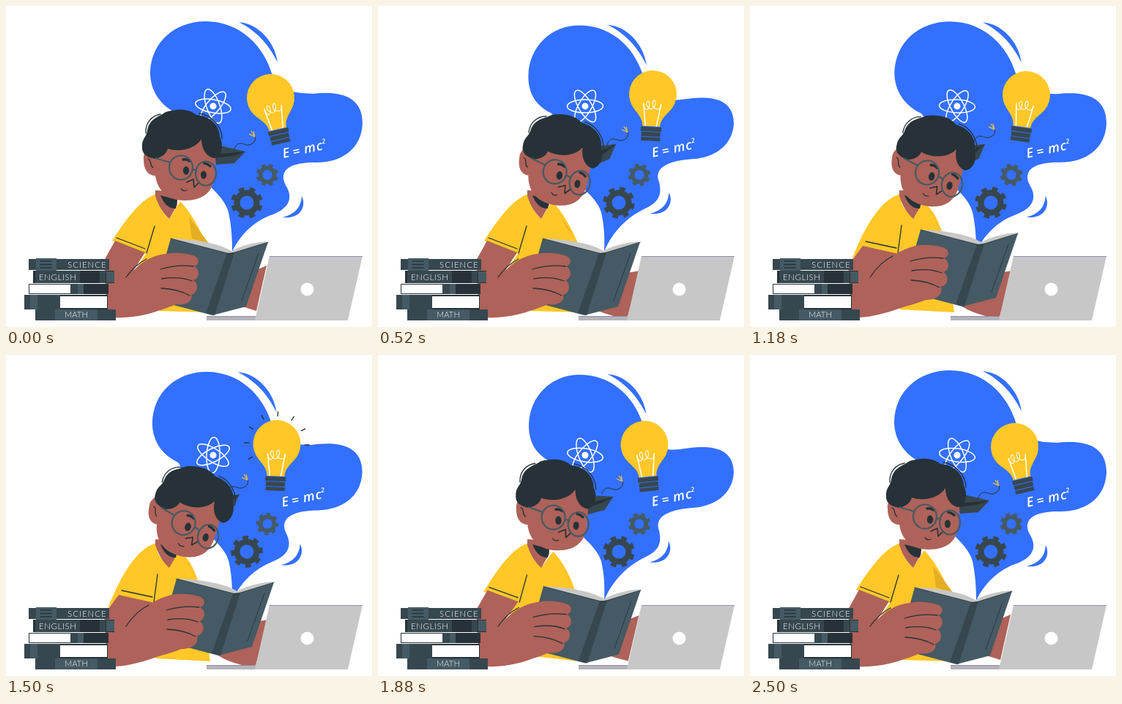
An HTML page that plays this animation: 500 by 439 pixels, repeating every 2.52 s.

```html
<!DOCTYPE html>
<html lang="en">
<head>
<meta charset="utf-8">
<title>Reading and ideas</title>
<style>
html, body { margin: 0; width: 100%; height: 100%; overflow: hidden; background: #fff; }
svg { display: block; width: 100vw; height: 100vh; }
.blue { fill: #3370ff; }
.ink { fill: #263238; }
.dark { fill: #37474f; }
.slate { fill: #455a64; }
.skin { fill: #ae6259; }
.sun { fill: #ffc727; }
.line { fill: none; stroke: #263238; stroke-width: 1.3; stroke-linecap: round; stroke-linejoin: round; }
.chalk { fill: none; stroke: #fff; stroke-width: 1.5; }
.frame { fill: none; stroke: #455a64; stroke-width: 2.2; }
text { fill: #fff; font: 300 11.5px Lato, sans-serif; }
#formula text { font: italic 600 18px "Open Sans", sans-serif; }
</style>
</head>
<body>
<svg viewBox="0 0 500 439">
  <defs>
    <g id="gear" fill="none">
      <circle r="13.5" stroke-width="8"/>
      <circle r="18.5" stroke-width="6.5" pathLength="16" stroke-dasharray="1" transform="rotate(11.25)"/>
    </g>
  </defs>

  <path id="blob" class="blue"/>
  <path id="topArc" class="blue" d="M318 22C344 24 367 48 371 77C361 57 346 36 318 22Z"/>
  <path id="lowArc" class="blue" d="M404 260C411 274 402 292 378 289C394 285 403 276 404 260Z"/>

  <g id="atom" class="chalk">
    <ellipse rx="24.5" ry="9"/>
    <ellipse rx="24.5" ry="9" transform="rotate(60)"/>
    <ellipse rx="24.5" ry="9" transform="rotate(120)"/>
    <circle r="4.5" fill="#fff" stroke="none"/>
  </g>
  <g id="formula">
    <text x="0" y="0">E</text><text x="14" y="1">=</text><text x="30" y="0">m</text><text x="47" y="0">c</text>
    <text x="56" y="-8" style="font-size:9px">2</text>
  </g>
  <use id="bigGear" href="#gear" stroke="#37474f"/>
  <use id="smallGear" href="#gear" stroke="#455a64"/>

  <g id="bulb">
    <g id="rays" class="line"></g>
    <path class="sun" d="M-12 44C-12 35 -18 29 -24 22A32.5 32.5 0 1 1 24 22C18 29 12 35 12 44Z"/>
    <path class="chalk" d="M-8 44L-12 13M7 44L12 13"/>
    <path class="chalk" style="stroke-width:1" d="M-12 13C-11 26 -3 23 -4 13C-5 6 -11 12 -6 18C0 25 5 16 4 10C2 5 -2 13 2 18C8 23 12 19 12 13"/>
    <path class="dark" d="M-14 45H14V51H-14ZM-13 52H13V58H-13ZM-13 59H13V64H-13Z"/>
  </g>

  <g id="cap">
    <path class="dark" d="M284 189L327 199L312 215L287 217Z"/>
    <path class="ink" d="M284 203L327 199L310 205L284 208Z"/>
  </g>
  <g id="tassel">
    <path class="line" style="stroke-width:1" d="M312 196C314 186 322 187 328 190C336 191 343 185 340 178"/>
    <path d="M340 179L332 175M340 179L335 171M340 179L338 171" stroke="#d3b369" stroke-width="1.4"/>
  </g>

  <path id="shirt" class="sun"/>
  <path id="fold" fill="#e3ae22"/>
  <path id="seams" class="line"/>
  <path class="skin" d="M204 252L204 260C209 275 215 284 223 291L234 272L234 254Z"/>
  <path class="ink" d="M211 259L234 265L232 277C222 277 216 271 211 259Z"/>

  <g id="head">
    <path class="skin" d="M203 180C196 198 187 197 188 210C188 224 194 232 204 232C207 253 222 266 244 266C270 266 283 254 285 232L287 190L250 165Z"/>
    <g id="hair">
      <path class="ink" d="M204 209C192 207 185 202 186 192C186 180 192 180 193 170C196 153 211 151 218 145C233 140 250 140 260 149C278 150 292 163 292 179C298 190 295 205 285 208C274 207 267 195 267 182C257 197 236 200 221 195C219 203 212 207 204 209Z"/>
      <path class="line" d="M191 174C190 160 199 150 211 148M264 147C281 149 295 165 295 181"/>
    </g>
    <path class="line" d="M194 209C200 211 195 217 201 221"/>
    <path class="line" style="stroke-width:3.5" d="M242 210Q247 209 251 212"/>
    <ellipse class="ink" cx="246" cy="225" rx="4.2" ry="5.8"/>
    <path class="line" style="stroke-width:1.6" d="M247 241L256 237L257 248L264 241"/>
    <path class="line" d="M239 250Q242 254 247 252"/>
    <path class="frame" d="M254 225Q258 222 261 226M224 214L204 208"/>
    <ellipse class="frame" cx="239" cy="221" rx="16" ry="16.5"/>
    <g id="farEye">
      <path class="line" style="stroke-width:3.5" d="M271 215Q276 216 279 219"/>
      <ellipse class="ink" cx="270" cy="231" rx="4" ry="5.6"/>
      <ellipse class="frame" cx="273" cy="229" rx="14" ry="16.5"/>
    </g>
  </g>

  <path id="farHand" class="skin"/>
  <g id="book">
    <path fill="#c7c7c7" d="M226 318C260 319 292 325 308 335C322 327 340 323 358 322L307 342Z"/>
    <path class="slate" d="M225 318L306 339L358 323L328 411L282 423L214 405L209 374Z"/>
    <path class="dark" d="M302 338L312 337L285 423L273 420Z"/>
    <path class="line" style="stroke-width:.8" d="M225 318L306 339L358 323M345 338L322 403"/>
  </g>
  <path id="arm" class="skin"/>
  <path id="creases" class="line"/>

  <path fill="#b4b4b8" d="M274 424H407V430H274Z"/>
  <path fill="#c7c7c7" d="M360 342H487L467 430H340Z"/>
  <path d="M360 342.5H487M274 424.5H340" stroke="#8580b5" stroke-width=".8"/>
  <circle cx="411.5" cy="387.5" r="9" fill="#fff"/>

  <g id="stack">
    <path class="ink" d="M31 346H141V361H31ZM37 362H148V379H37ZM31 380H140V394H31ZM25 395H139V415H25ZM40 415H150V430H40Z"/>
    <path class="dark" d="M31 346H41V361H31ZM69 346H141V361H69ZM40 362H101V379H40ZM128 362H136V379H128ZM88 380H98V394H88ZM25 395H74V415H25ZM40 415H150V430H40Z"/>
    <path class="slate" d="M41 345H69V362H41ZM137 363H148V378H137ZM98 380H106V394H98ZM33 395H43V415H33ZM67 415H125V430H67Z"/>
    <path fill="#fff" d="M32 381H88V393H32ZM74 397H138V413H74Z"/>
    <path class="line" style="stroke-width:1.5" d="M47 349H62M47 353.5H62M47 358H62M104 367H126M104 373H126"/>
    <text x="84" y="358" letter-spacing="1">SCIENCE</text>
    <text x="45" y="374.5" letter-spacing=".6">ENGLISH</text>
    <text x="80" y="426" letter-spacing=".2" style="font-size:11px">MATH</text>
  </g>
</svg>
<script>
const LOOP = 2520;
const TIMES = [0, 520, 840, 1180, 1500, 1880, LOOP];
const $ = id => document.getElementById(id);
const pose = (id, value) => $(id).setAttribute('transform', value);

const shapes = {
  blob: [
    'M309 336C309 318 308 300 304 282C298 260 275 245 246 215C236 175 244 152 232 146C210 135 197 115 197 91C198 50 230 21 273 21C320 21 352 55 363 92C372 118 395 119 420 120C440 118 487 115 487 160C486 198 455 214 425 214C395 213 370 221 382 245C394 264 385 278 362 286C340 294 320 312 309 336Z',
    'M309 336C310 316 309 300 305 282C298 260 275 247 246 215C236 175 246 152 236 146C216 136 206 120 206 96C207 55 238 27 275 27C318 27 348 55 361 92C372 128 390 131 412 129C438 125 486 118 486 161C484 192 458 207 430 209C402 211 376 219 384 240C388 258 384 268 362 278C342 288 320 308 309 336Z'],
  shirt: [
    'M206 257C185 263 165 290 145 321L191 339L175 363L205 417L279 419L273 324C264 304 254 284 238 267L223 291C213 283 207 270 206 257Z',
    'M206 257C180 263 157 300 139 347L155 329L203 341L172 363L205 415L279 419L267 313C260 298 250 282 238 267L223 291C213 283 207 270 206 257Z'],
  fold: ['M250 288L278 326L254 318Z', 'M250 290L267 313L258 302Z'],
  seams: ['M151 317L190 332M203 301L192 338', 'M158 322L200 331M207 300L202 338'],
  farHand: [
    'M330 366L356 355L342 417L326 412Q322 411 318 408Z',
    'M334 366L358 362L341 425L322 424Q302 419 290 411Z'],
  arm: [
    'M149 321L190 337L174 362C185 350 200 341 218 339C232 336 250 339 258 342C265 346 264 354 257 356C266 361 264 373 256 375C264 380 262 393 253 395C256 404 245 410 232 408C225 411 215 415 210 416C190 424 165 427 148 426L138 420L134 348Z',
    'M154 328L203 339L172 362C188 345 205 333 226 328C240 325 258 328 266 331C273 335 272 343 265 345C274 350 272 362 264 364C273 369 271 382 261 384C264 396 253 402 240 402C230 406 220 409 212 411C194 417 168 426 148 426L138 420L134 355Z'],
  creases: [
    'M164 371Q176 354 192 346M211 360Q234 353 256 356M213 373Q236 369 254 376M212 386Q235 387 251 396',
    'M164 371Q178 350 195 342M219 349Q242 342 264 345M221 362Q244 358 262 365M220 375Q243 376 259 385']
};

// Blend two paths that share the same commands.
function mix(id, f) {
  const [a, b] = shapes[id];
  const ends = b.match(/[\d.]+/g);
  let i = 0;
  $(id).setAttribute('d', a.replace(/[\d.]+/g, n => (+n + (ends[i++] - n) * f).toFixed(2)));
}

// Cyclic monotone spline through six values placed at TIMES.
function key(t, ...v) {
  const span = i => TIMES[i + 1] - TIMES[i];
  const slope = i => (v[(i + 1) % 6] - v[i]) / span(i);
  const tangent = i => {
    const a = slope((i + 5) % 6), b = slope(i % 6);
    return a * b > 0 ? 2 * a * b / (a + b) : 0;
  };
  const i = TIMES.findIndex(x => x > t) - 1;
  const h = span(i), u = (t - TIMES[i]) / h, w = u * u * (3 - 2 * u);
  return v[i] * (1 - w) + v[(i + 1) % 6] * w
    + h * u * (1 - u) * (tangent(i) * (1 - u) - tangent(i + 1) * u);
}

for (let a = -120; a <= 90; a += 30)
  $('rays').innerHTML += `<path d="M0 -38V-44" transform="rotate(${a})"/>`;

function draw(now) {
  const t = now % LOOP;
  const turn = t / LOOP;
  const swell = (1 - Math.cos(turn * 4 * Math.PI)) / 2;
  const nod = key(t, 0, .67, .53, .8, 1, .13);
  const lift = key(t, 0, 0, 0, 1, 1, .12);

  mix('blob', swell);
  pose('topArc', `translate(${-4.5 * swell} ${4 * swell})`);
  pose('lowArc', `translate(${-7 * swell} ${-5.5 * swell})`);
  pose('atom', `translate(283 137) rotate(${10 + 240 * turn})`);
  pose('formula', `translate(${379 - 4 * swell} ${208 - swell}) rotate(-12)`);
  pose('bigGear', `translate(329 269) rotate(${180 * turn})`);
  pose('smallGear', `translate(357 231) rotate(${-180 * turn}) scale(.7)`);

  const x = key(t, 361.5, 375.5, 381.5, 377.5, 370, 364);
  const y = key(t, 125.5, 120.5, 120.5, 121.5, 121.5, 122.5);
  pose('bulb', `translate(${x} ${y}) rotate(${key(t, -13, 3, 12, 8, 2, -6)})`);
  const beat = t % 630;
  $('rays').style.display = beat > 157 && beat < 472 ? '' : 'none';

  pose('cap', `translate(${key(t, 0, 2, 2, -2, -5, -4)}) rotate(${key(t, 0, -20, -20, -20, -16, -10)} 296 205)`);
  pose('tassel', `translate(${key(t, 0, 1, -2, -6, -10, -6)} ${key(t, 0, -6, -10, -10, -8, -6)})`);
  pose('head', `translate(${2 * nod}) rotate(${14 * nod} 205 232)`);
  pose('hair', `translate(${6 * nod})`);
  pose('farEye', `translate(${3 * nod} ${2 * nod})`);

  mix('shirt', lift);
  mix('fold', Math.min(1, swell + lift));
  mix('seams', lift);
  mix('farHand', Math.min(1, nod * 1.5));
  pose('book', `translate(${8 * lift} ${-12 * lift})`);
  mix('arm', lift);
  mix('creases', lift);
}

function tick() {
  draw(performance.now());
  requestAnimationFrame(tick);
}
tick();
</script>
</body>
</html>
```
